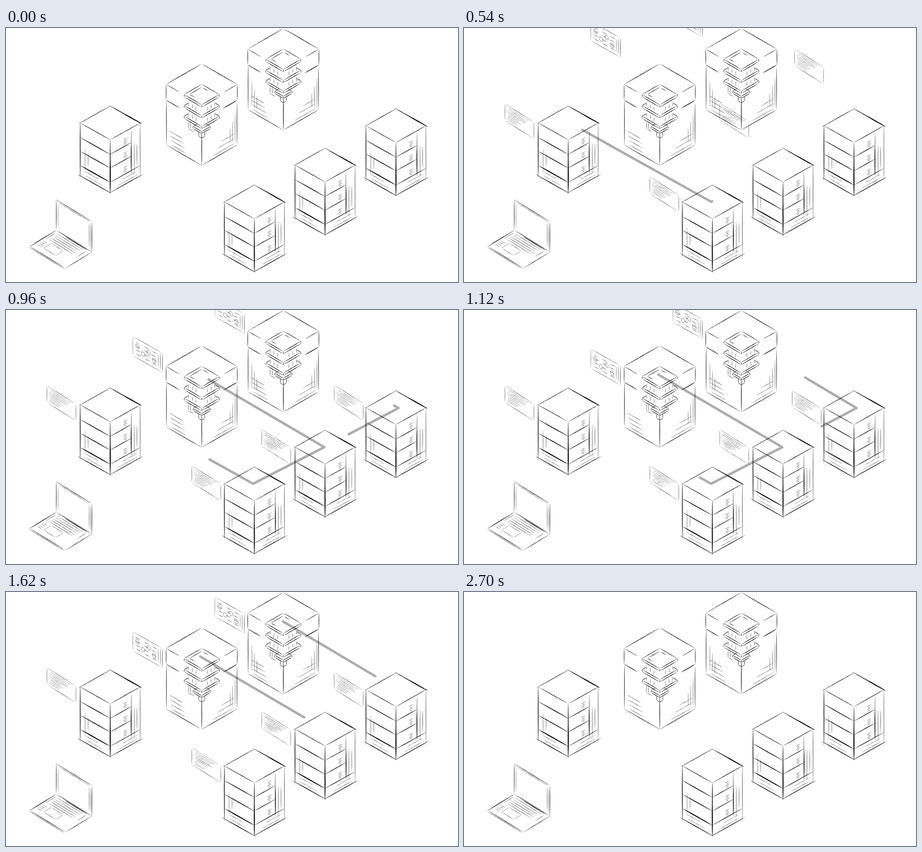
These frames come from a looping animation (889 px wide and 500 px high, 2.72 s). An HTML page:

```html
<!DOCTYPE html>
<html lang="en">
<head>
<meta charset="utf-8">
<title>Network sketch</title>
<style>
html, body { margin: 0; width: 100%; height: 100%; overflow: hidden; background: #fff; }
svg { display: block; width: 100vw; height: 100vh; }
</style>
</head>
<body>
<svg id="stage" viewBox="0 0 889 500" xmlns="http://www.w3.org/2000/svg"></svg>
<script>
const LOOP = 2720;
const stage = document.getElementById('stage');

function add(name, attrs, parent = stage) {
  const el = document.createElementNS('http://www.w3.org/2000/svg', name);
  for (const key in attrs) el.setAttribute(key, attrs[key]);
  return parent.appendChild(el);
}

function sketch(x, y, d, parent) {
  return add('path', { d, transform: `translate(${x} ${y})` }, parent);
}

// Joins the strokes made for i = 0 .. n-1.
const times = (n, make) => Array.from({ length: n }, (_, i) => make(i)).join('');

function random(seed) {
  return () => (seed = seed * 16807 % 2147483647) / 2147483647;
}

// A pen stroke, full in the middle and tapered at both ends.
function pen(x1, y1, x2, y2, w) {
  const dx = x2 - x1, dy = y2 - y1, len = Math.hypot(dx, dy) || 1;
  const nx = dy / len * w * .67, ny = -dx / len * w * .67;
  const at = (f, side) => `${x1 + dx * f + nx * side} ${y1 + dy * f + ny * side}`;
  return `M${x1} ${y1}C${at(.1, 1)} ${at(.9, 1)} ${x2} ${y2}C${at(.9, -1)} ${at(.1, -1)} ${x1} ${y1}Z`;
}

// A slanted plane: returns a stroke maker that works in its (u, v) units.
function plane(ox, oy, ux, uy, vx, vy) {
  const x = (u, v) => ox + ux * u + vx * v, y = (u, v) => oy + uy * u + vy * v;
  return (u1, v1, u2, v2, w) => pen(x(u1, v1), y(u1, v1), x(u2, v2), y(u2, v2), w);
}

// The three visible sides of a box whose top corner is the origin.
function box(rx, ry, h) {
  return {
    lid: plane(0, 0, rx, ry, -rx, ry),
    left: plane(-rx, ry, rx, ry, 0, h),
    right: plane(0, 2 * ry, rx, -ry, 0, h)
  };
}

function server(x, y) {
  const { lid, left, right } = box(59, 33.3, 104);
  const shelves = [.275, .535, .805];
  const vents = top => times(4, k =>
    right(.43 + k % 2 * .03, top - .13 + k * .03, .58 - k % 2 * .02, top - .13 + k * .03, .5));
  sketch(x, y,
    lid(-.04, 0, 1.06, 0, 1.3) + lid(.35, 0, 1.06, 0, 2) + lid(0, -.04, 0, 1.06, .9)
    + lid(0, 1, 1, 1, 1) + lid(1, -.04, 1, 1, 1)
    + left(0, -.03, 0, 1.06, 1.3) + left(1, -.02, 1, 1.02, 1.4) + left(1, .3, 1, 1.02, 2)
    + left(-.08, 1, 1.05, 1, 1.3) + right(-.04, 1, 1.1, 1, 1.2)
    + right(1, -.05, 1, 1.08, .65)
    + right(.7, .02, .7, .86, .7) + right(.7, .27, .7, .86, 1.5)
    + shelves.map((v, i) => left(0, v, 1, v, i === 2 ? 1.9 : 1.4)
      + right(0, v, i === 2 ? 1 : .7, v, 1.1) + vents(v)).join('')
    + times(2, k => left(.16 + k * .1, .42 + k * .06, .16 + k * .1, .9 - k * .15, .5)
      + right(.8 + k * .09, .3 + k * .05, .8 + k * .09, .92 - k * .15, .55)
      + left(.16, .94 - k * .07, .75 - k * .12, .94 - k * .07, .45)
      + right(.25 + k * .1, .95 - k * .07, .92, .95 - k * .07, .45)));
}

// One plate of the cooling stack, centred at height cy.
function plate(cy, r, thick, back) {
  const top = plane(0, cy, r, r * .585, -r, r * .585);
  const low = plane(0, cy + thick, r, r * .585, -r, r * .585);
  return top(.5, -.5, .5 - back, -.5, .9) + top(-.5, .5, -.5, .5 - back, .9)
    + [top, low].map(p => p(.5, -.5, .5, .5, 1) + p(-.5, .5, .5, .5, 1)).join('')
    + [-r, 0, r].map(x => pen(x, cy + (x ? 0 : r * .585), x, cy + thick + (x ? 0 : r * .585), .8)).join('');
}

function quantum(x, y, upright) {
  const { lid, left, right } = box(70, 40.5, 119);
  const rim = .26;
  const shell = lid(0, 0, 1, 0, 1) + lid(0, 0, 0, 1, 1)
    + lid(0, 1, .38, 1, .8) + lid(1, 0, 1, .38, .8)
    + left(0, 0, 0, rim, .9) + right(1, 0, 1, rim, .9)
    + left(0, rim, .38, rim, 1.1) + right(1, rim, .6, rim, 1.3)
    + left(.01, rim, .01, 1, .9) + right(.99, rim + .04, .99, 1, .9)
    + left(0, 1, 1, 1, .9) + right(0, 1, 1, 1, .9) + left(1, .45, 1, 1, 1.1);
  const posts = cy => times(8, k => {
    const px = (k - 3.5) * 7.4, foot = cy + 17 - Math.abs(px) * .585;
    return Math.abs(px) < 5 ? '' : pen(px, foot - 9, px, foot, .55);
  });
  const frame = plane(0, 46, 24, 14, -24, 14);
  const stack = plate(60.5, 34.5, 4.5, 1) + plate(82, 34.5, 4.5, .25) + plate(103, 34.5, 4.5, .25)
    + posts(82) + posts(103) + plate(123.5, 17, 4, .5)
    + times(3, k => frame(0, k * .12, 0, 1 - k * .1, .7)) + frame(0, 1, .45, 1, .7)
    + frame(.1, 0, .55, 0, .7)
    + [-6, 0, 6].map(px => pen(px, 137 - Math.abs(px) * .5, px, 146 - Math.abs(px) * .5, .8)).join('')
    + pen(-6, 143, 0, 146, .8) + pen(6, 143, 0, 146, .8)
    + times(2, k => pen(-26 + k * 4, 113 + k * 2, -26 + k * 4, 129, .6)) + pen(-26, 128, -15, 134, .6);
  const hatch = times(4, k => left(.08 + k * .02, .74 + k * .07, .48 + k * .03, .74 + k * .07, .5))
    + times(3, k => right(.94 - k * .07, .45 + k * .1, .94 - k * .07, .96 - k * .03, .5)
      + right(.3 + k * .12, .95 - k * .08, .92, .95 - k * .08, .45)
      + (upright ? left(.12 + k * .07, .48 + k * .1, .12 + k * .07, .92, .5) : ''));
  sketch(x, y, shell + stack + hatch);
}

function laptop() {
  const screen = plane(0, 0, 70, 43, 0, 60);
  const base = plane(0, 60, 70, 43, -52, 32);
  sketch(99, 338,
    screen(-.02, 0, 1.02, 0, .9) + screen(0, -.02, 0, 1, .9) + screen(1, 0, 1, 1.04, .9)
    + screen(0, 1, 1, 1, 1) + screen(.06, .05, .94, .05, .5)
    + times(2, k => screen(.96 - k * .04, .08, .96 - k * .04, .96 - k * .06, .5))
    + screen(.05, .08, .05, .93, .4)
    + base(0, 0, 0, 1.02, 1.1) + base(0, 1, 1, 1, .9) + base(0, 1.04, 1, 1.04, .6)
    + base(1, 0, 1, 1, .8) + base(.25, .03, .9, .03, 1.1)
    + times(5, k => base(.09, .1 + k * .08, .84 - k * .01, .1 + k * .08, .55))
    + base(.05, .08, .05, .46, .5) + base(.9, .08, .9, .42, .5)
    + base(.23, .5, .57, .5, .45) + base(.23, .79, .57, .79, .45)
    + base(.23, .5, .23, .79, .45) + base(.57, .5, .57, .79, .45)
    + times(4, k => base(.05, .58 + k * .07, .18, .58 + k * .07, .4)));
}

function note() {
  const p = plane(0, 0, 57, 36, 0, 33);
  const rnd = random(11);
  return p(0, 0, 0, 1, .5) + p(1, 0, 1, 1, .5) + p(0, 0, 1, 0, .4) + p(0, 1, 1, 1, .4)
    + times(8, k => {
      const v = .12 + k * .1;
      return p(.06, v, .9 - k * .055 - rnd() * .15, v, .33);
    });
}

function circuit() {
  const p = plane(0, 0, 58, 33, 0, 38);
  const rnd = random(5);
  const chip = (u, v) => p(u, v, u + .11, v, .45) + p(u, v + .2, u + .11, v + .2, .45)
    + p(u, v, u, v + .2, .45) + p(u + .11, v, u + .11, v + .2, .45);
  return p(0, 0, 1, 0, .45) + p(0, 0, 0, 1, .4) + p(0, 1, 1, 1, .45)
    + times(3, k => p(1 - k * .07, k * .06, 1 - k * .07, 1 - k * .06, .65 - k * .1))
    + times(4, row => times(3, k => {
      const u = .07 + k * .27 + rnd() * .06, v = .2 + row * .2;
      return p(u, v, u + .18, v, .45);
    }))
    + times(4, k => chip(.1 + k * .19, .28 + k % 2 * .25));
}

[[205, 153.5], [767, 159], [627.5, 236.5], [488.5, 309]].forEach(p => server(...p));
quantum(385, 70.5, false);
quantum(545.5, 1, true);
laptop();

// Resting place, start offset and landing time of every note.
const cards = [
  { x: 80.5, y: 149, dx: 0, dy: -228, end: 240, art: note },
  { x: 365.5, y: 306.5, dx: 0, dy: -395, end: 560, art: note },
  { x: 503, y: 235, dx: 0, dy: -326, end: 738, art: note },
  { x: 645.5, y: 158, dx: 10, dy: -255, end: 1000, art: note },
  { x: 249.5, y: 78, dx: 0, dy: -175, end: 1130, art: circuit },
  { x: 411, y: 10, dx: 0, dy: -100, end: 1480, art: circuit }
];
const layer = add('g', {});
for (const c of cards) c.el = sketch(c.x, c.y, c.art(), layer);

const trunk = [[135, 376], [203, 184], [486, 342], [626, 270], [382, 127]];
const branch = [[626, 270], [772, 193], [545, 58]];
const [trunkEl, branchEl] = [0, 1].map(() => add('path', {
  fill: 'none', stroke: '#000', 'stroke-opacity': .32, 'stroke-width': 4.8,
  'stroke-linecap': 'round', 'stroke-linejoin': 'round'
}));

// Linear interpolation between [time, value] pairs.
function track(t, ...keys) {
  if (t <= keys[0][0]) return keys[0][1];
  for (let i = 1; i < keys.length; i++) {
    const [t0, v0] = keys[i - 1], [t1, v1] = keys[i];
    if (t < t1) return v0 + (v1 - v0) * (t - t0) / (t1 - t0);
  }
  return keys[keys.length - 1][1];
}

// The part of a polyline between two distances from its start.
function slice(pts, from, to) {
  let pos = 0, d = '';
  for (let i = 1; i < pts.length; i++) {
    const [ax, ay] = pts[i - 1], [bx, by] = pts[i];
    const len = Math.hypot(bx - ax, by - ay);
    const a = Math.max(0, (from - pos) / len), b = Math.min(1, (to - pos) / len);
    if (a < b) {
      if (!d) d = `M${ax + (bx - ax) * a} ${ay + (by - ay) * a}`;
      d += `L${ax + (bx - ax) * b} ${ay + (by - ay) * b}`;
    }
    pos += len;
  }
  return d;
}

function draw(t) {
  for (const c of cards) {
    const left = 1 - Math.min(1, t / c.end);
    c.el.setAttribute('transform', `translate(${c.x + c.dx * left} ${c.y + c.dy * left})`);
  }
  layer.setAttribute('opacity', track(t, [2200, 1], [2690, 0]));
  trunkEl.setAttribute('d', slice(trunk,
    track(t, [20, 0], [2140, 968]), track(t, [10, 0], [980, 968])));
  branchEl.setAttribute('d', slice(branch,
    track(t, [702, 0], [1490, 165], [2140, 429.5]), track(t, [700, 0], [1340, 429])));
}

const start = performance.now();
function tick() {
  draw((performance.now() - start) % LOOP);
  requestAnimationFrame(tick);
}
tick();
</script>
</body>
</html>
```
